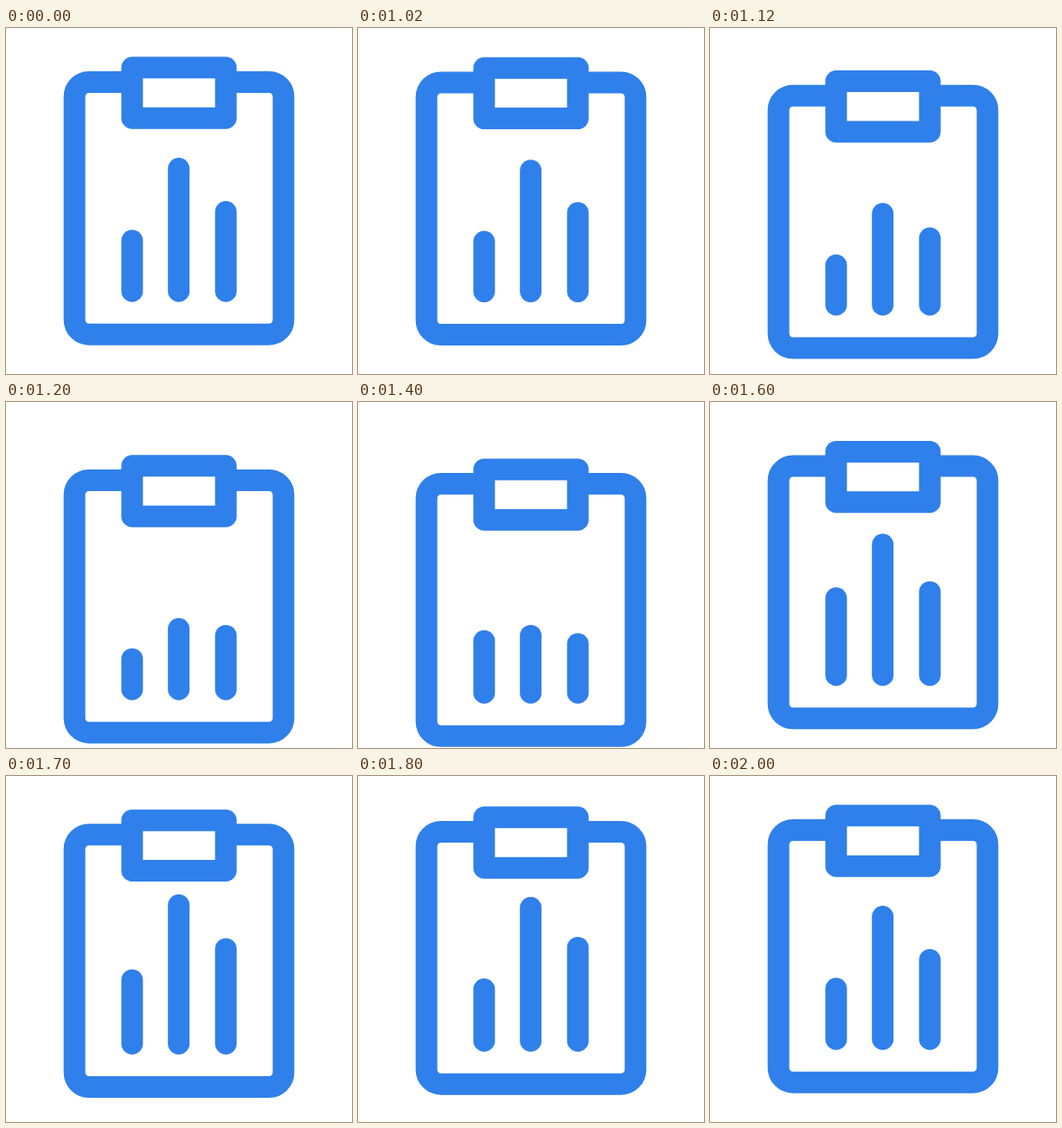
These frames come from a looping animation (400 px wide and 400 px high, 2020 ms). An HTML page with a canvas:

```html
<!DOCTYPE html>
<html lang="en">
<head>
<meta charset="utf-8">
<title>Clipboard chart</title>
<style>
html, body { margin: 0; width: 100%; height: 100%; overflow: hidden; background: #fff; }
canvas { display: block; width: 400px; height: 400px; }
</style>
</head>
<body>
<canvas id="stage" width="400" height="400"></canvas>
<script>
const ctx = document.getElementById('stage').getContext('2d');
const LOOP = 2020, STEP = 25, START = 995;
const U = 400 / 24;          // icon grid unit
const BASE = 18.25 * U;      // lower end of the bars
const CAP = 0.75 * U;

function bezier(x1, y1, x2, y2) {
  const at = (a, b, s) => 3 * a * s * (1 - s) ** 2 + 3 * b * s * s * (1 - s) + s ** 3;
  return x => {
    let lo = 0, hi = 1;
    for (let i = 0; i < 24; i++) {
      const mid = (lo + hi) / 2;
      if (at(x1, x2, mid) < x) lo = mid; else hi = mid;
    }
    return at(y1, y2, (lo + hi) / 2);
  };
}

const smooth = x => x * x * (3 - 2 * x);
const drop = bezier(0.4, 0, 0.3, 1);
const rise = bezier(0.333, 0, 0.2, 1);

// keys: [time, value, easing into this key]
function track(keys, t) {
  for (let i = 1; i < keys.length; i++) {
    const [t0, v0] = keys[i - 1], [t1, v1, ease = smooth] = keys[i];
    if (t < t1) return v0 + (v1 - v0) * ease((t - t0) / (t1 - t0));
  }
  return keys[keys.length - 1][1];
}

const shift = [[0, 0], [333, 2 * U, drop], [1000, 0, rise]];

const bars = [
  { x: 8.75 * U, top: [[0, 14 * U], [260, 260.3], [550, 200], [833, 14 * U]] },
  { x: 199.7, top: [[0, 9 * U], [300, 247], [665, 131], [1000, 9 * U]] },
  { x: 15.25 * U, top: [[0, 12 * U], [312, 242], [734, 181], [1000, 12 * U]] }
];

function drawBoard() {
  const l = 4.75 * U, r = 19.25 * U, t = 3.75 * U, b = 21.25 * U;
  ctx.beginPath();
  ctx.moveTo(8.75 * U, t);
  ctx.arcTo(l, t, l, b, U);
  ctx.arcTo(l, b, r, b, U);
  ctx.arcTo(r, b, r, t, U);
  ctx.arcTo(r, t, l, t, U);
  ctx.lineTo(15.25 * U, t);
  ctx.stroke();
}

function drawClip() {
  ctx.strokeRect(8.75 * U, 2.75 * U, 6.5 * U, 3.5 * U);
}

function drawBar(x, top) {
  ctx.beginPath();
  ctx.moveTo(x, top + CAP);
  ctx.lineTo(x, BASE);
  ctx.stroke();
}

function draw(time) {
  const t = Math.max(0, Math.floor((time - START) / STEP) * STEP);
  ctx.fillStyle = '#fff';
  ctx.fillRect(0, 0, 400, 400);
  ctx.save();
  ctx.translate(0, track(shift, t));
  ctx.strokeStyle = '#2f80ea';
  ctx.lineWidth = 1.5 * U;
  ctx.lineJoin = 'round';
  ctx.lineCap = 'butt';
  drawBoard();
  drawClip();
  ctx.lineCap = 'round';
  for (const bar of bars) drawBar(bar.x, track(bar.top, t));
  ctx.restore();
}

const begin = performance.now();
function tick() {
  draw((performance.now() - begin) % LOOP);
  requestAnimationFrame(tick);
}
tick();
</script>
</body>
</html>
```
